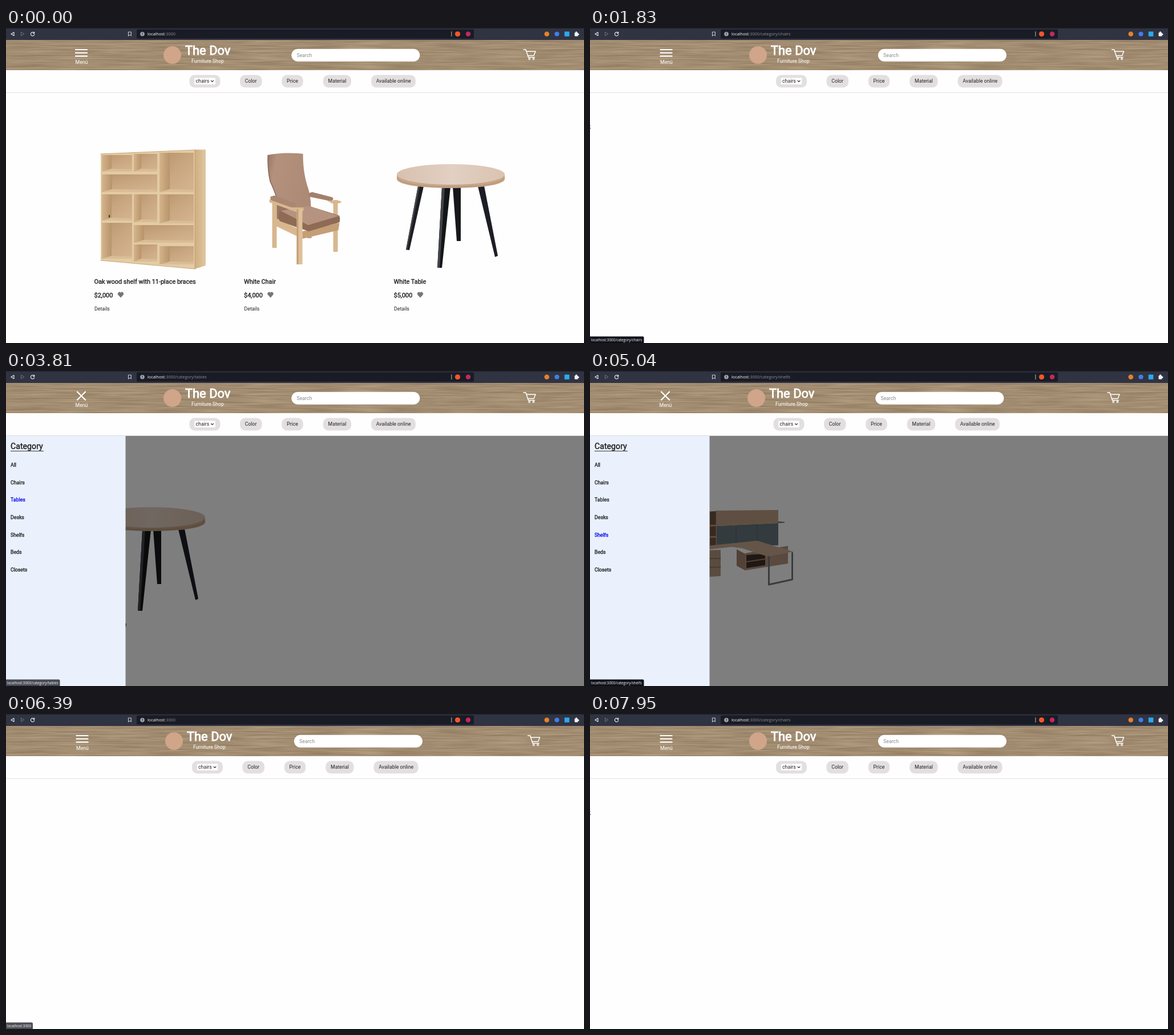
Recreate the animation shown at these times as an HTML page. Size 1013 px wide and 553 px high, loop 8000 ms.

```html
<!DOCTYPE html>
<html lang="en">
<head>
<meta charset="utf-8">
<title>Furniture Shop</title>
<style>
html, body { margin: 0; width: 100%; height: 100%; overflow: hidden; background: #fefefe; }
svg { display: block; width: 100vw; height: 100vh; }
text { font-family: Roboto, sans-serif; font-size: 8.76px; fill: #222; white-space: pre; }
.chrome { font-family: "Open Sans", "Noto Sans", sans-serif; }
.bold { stroke: #1c1c1c; stroke-width: .35px; fill: #1c1c1c; }
.item { stroke-width: .3px; }
.item.on { fill: #0000ee; stroke: #0000ee; }
.head { font-size: 10.95px; }
.light { fill: #fff; }
</style>
</head>
<body>
<svg id="stage" viewBox="0 0 1013 553" preserveAspectRatio="none">
  <defs>
    <filter id="wood" x="0" y="0" width="100%" height="100%" color-interpolation-filters="sRGB">
      <feTurbulence type="fractalNoise" baseFrequency=".012 .4" numOctaves="3" seed="8"/>
      <feColorMatrix values=".2 0 0 0 .535  .2 0 0 0 .452  .19 0 0 0 .35  0 0 0 0 1"/>
    </filter>
    <linearGradient id="cloth" x1="0" x2="1" y1="0" y2=".3">
      <stop offset="0" stop-color="#967765"/><stop offset=".22" stop-color="#b3917c"/><stop offset="1" stop-color="#ad8a75"/>
    </linearGradient>
    <linearGradient id="board" x1="0" x2="1">
      <stop offset="0" stop-color="#cfae80"/><stop offset="1" stop-color="#e0c6a0"/>
    </linearGradient>
    <linearGradient id="back" x1="0" x2=".8" y1="0" y2="1">
      <stop offset="0" stop-color="#b8946c"/><stop offset=".5" stop-color="#c8a680"/><stop offset="1" stop-color="#d3b38e"/>
    </linearGradient>
    <linearGradient id="side" x1="0" x2="1">
      <stop offset="0" stop-color="#d4b48c"/><stop offset="1" stop-color="#b8946a"/>
    </linearGradient>
    <linearGradient id="topwood" x1="0" x2="1">
      <stop offset="0" stop-color="#d8c0ad"/><stop offset=".5" stop-color="#e2d0c3"/><stop offset="1" stop-color="#dac3b0"/>
    </linearGradient>
  </defs>
  <rect width="1013" height="553" fill="#fefefe"/>
  <g id="page"></g>
  <rect id="shade" y="113.5" width="1013" height="439.5" fill="#000"/>
  <g id="panel"></g>
  <g id="top"></g>
  <g id="status"><path id="statusBox" fill="#10121b"/><text id="statusText" class="chrome light" x="2" y="549.8" style="font-size:6.25px"/></g>
</svg>
<script>
const LOOP = 8000;
const $ = id => document.getElementById(id);
const clamp = v => Math.max(0, Math.min(1, v));
const ease = p => { p = clamp(p); return 1 - Math.pow(1 - p, 2.3) * (1 + 1.1 * p); };

const text = (x, y, s, cls = '', extra = '') => `<text x="${x}" y="${y}" class="${cls}" ${extra}>${s}</text>`;
const rect = (x, y, w, h, fill, r = 0) => `<rect x="${x}" y="${y}" width="${w}" height="${h}" rx="${r}" fill="${fill}"/>`;
const poly = (pts, fill) => `<polygon points="${pts}" fill="${fill}"/>`;
const path = (d, fill, stroke = 'none', w = 1) =>
  `<path d="${d}" fill="${fill}" stroke="${stroke}" stroke-width="${w}" stroke-linecap="round" stroke-linejoin="round"/>`;
const dot = (x, y, r, fill) => `<circle cx="${x}" cy="${y}" r="${r}" fill="${fill}"/>`;

// Furniture, all placed in the first column
const cell = (x, y, w, h) => {
  const d = Math.min(18, w * .32);
  return rect(x, y, w, h, 'url(#back)') + poly(`${x},${y} ${x + d},${y} ${x + d},${y + h - 5} ${x},${y + h}`, 'url(#side)') +
    poly(`${x},${y + h} ${x + d},${y + h - 5} ${x + w},${y + h - 4} ${x + w},${y + h}`, '#d9bd96');
};

const shelf = () =>
  poly('166,221 331,214 331,423 166,408', '#e3cba4') +
  poly('331,214 350,215 350,417 331,423', 'url(#board)') +
  cell(168, 223, 53, 29) + cell(224, 221, 41, 31) + cell(269, 219, 60, 69) +
  cell(168, 257, 97, 31) + cell(168, 292, 53, 46) + cell(224, 292, 41, 49) +
  cell(269, 292, 60, 51) + cell(168, 342, 53, 63) + cell(224, 346, 105, 31) +
  cell(224, 380, 41, 30) + cell(269, 383, 60, 32) +
  path('M166 221L331 214H350M331 214V423M166 408L331 423', 'none', '#bf9a6a', .8) +
  rect(180, 328, 2, 5, '#4a3520', 1);

const chair = () => {
  const wood = '#d8b78f', edge = '#c39e76';
  return rect(204, 303, 8, 83, wood, 1) + rect(311, 302, 8, 91, wood, 1) + rect(265, 363, 8, 6, edge) +
    path('M196 223Q225 217 258 221Q258 252 265 275Q272 294 272 316L219 322Q211 292 200 270Q195 250 196 223Z', 'url(#cloth)') +
    path('M197 224Q196 250 201 270Q211 292 219 320', 'none', '#8a6b59', 1.5) +
    poly('212,306 247,320 247,350 212,335', '#97755f') +
    poly('207,332 257,356 257,370 207,346', wood) + poly('257,357 322,342 320,355 257,370', edge) +
    path('M217 322L267 312L321 329Q324 333 322 341L268 357L217 339Q214 331 217 322Z', '#8f6b56') +
    path('M219 321L267 312L321 330L267 346Z', '#b69380') +
    poly('300,303 322,303 326,306 313,310', wood) +
    path('M268 290L274 288L309 297Q313 300 309 303L302 303L268 296Z', '#a3806c') +
    poly('199,301 238,315 259,315 259,321 246,323 199,306', wood) +
    path('M201 296L208 294L243 307Q248 311 243 314L236 314L201 302Z', '#a98772') +
    rect(247, 318, 10, 97, '#dfbf98', 1) + rect(247, 318, 3, 97, edge);
};

const table = () =>
  poly('197,278 207,278 182,390 176,389', '#1d1e22') + poly('197,278 200,278 178,390 176,389', '#45464c') +
  poly('258,279 272,279 272,374 265,374', '#17181b') +
  poly('302,278 313,277 337,400 332,402', '#1d1e25') +
  poly('239,279 254,279 239,421 231,421', '#141517') + poly('239,279 244,279 235,421 231,421', '#43444a') +
  path('M160 258V266C164 276 205 281 254.500 281S346 276 349 266V258Z', '#c6a588') +
  path('M160 263C168 275 210 279 254.500 279S341 275 349 263', 'none', '#aa8666', .7) +
  `<ellipse cx="254.500" cy="257" rx="94.500" ry="18" fill="url(#topwood)"/>`;

const desk = () =>
  poly('152,250 222,246 222,310 152,314', '#6e5442') +
  path('M152 274L222 271M152 294L222 291M209 247V310M222 246V310', 'none', '#c49f82', 2.5) +
  poly('222,272 330,267 330,306 222,306', '#66777c') +
  path('M256 271V305M293 269V300', 'none', '#4c5e63', .8) +
  poly('222,245 330,244 330,267 222,272', '#bf9f86') + poly('330,264 341,265 341,266.500 330,267', '#777') +
  poly('155,316 229,314 229,360 155,365', '#b69780') + path('M155 331L229 329M155 346L229 344', 'none', '#765a46', 1) +
  poly('257,313 272,321 272,350 257,342', '#a6846c') + poly('272,320 347,307 347,338 272,350', '#b4937c') +
  poly('274,323 307,321 307,341 274,346', '#3e3028') + path('M274 335L307 330', 'none', '#a98267', 2) +
  poly('155,312 293,298 293,304 155,319', '#c8a891') +
  poly('222,306 293,298 356,317 312,326 266,311', '#cbab94') +
  path('M313.500 326V375L354.500 366V319', 'none', '#74777a', 3);

const bed = () =>
  poly('150,262 300,250 300,310 150,330', '#c39d79') +
  poly('150,326 300,300 366,340 366,372 214,412 150,372', '#b88f69') +
  poly('150,312 298,290 364,328 364,352 214,392 150,356', '#e6e1da') +
  poly('190,314 298,292 364,328 240,356', '#f0ece6') +
  poly('160,302 215,294 226,306 172,316', '#f7f4ef') + poly('230,292 280,285 293,297 242,305', '#f7f4ef') +
  rect(360, 366, 6, 18, '#8e6b4b');

const closet = () =>
  rect(156, 222, 206, 194, '#c9a57c') + rect(156, 222, 206, 5, '#dfc199') +
  [160, 228, 296].map(x => rect(x, 230, 62, 180, '#d8b88d')).join('') +
  path('M226 228V411M294 228V411', 'none', '#94704c', 1.2) +
  path('M218 310V332M233 310V332M301 310V332', 'none', '#55483c', 2);

const GOODS = {
  shelf: [shelf(), 'Oak wood shelf with 11-place braces', '$2,000'],
  chair: [chair(), 'White Chair', '$4,000'],
  table: [table(), 'White Table', '$5,000'],
  desk: [desk(), 'White Desk', '$6,000'],
  bed: [bed(), 'White Bed', '$7,000'],
  closet: [closet(), 'White Closet', '$8,000']
};
const card = (key, col) => {
  const [art, name, price] = GOODS[key];
  return `<g transform="translate(${col * 262.5} 0)">${art}` +
    text(154.5, 448.5, name, 'bold head') + text(154.5, 472.6, price, 'bold head') +
    path('M201 473L196.800 468.600C194.500 465.500 198.500 461.500 201 465C203.500 461.500 207.500 465.500 205.200 468.600Z', '#757575', '#757575', .6) +
    text(155, 496, 'Details') + '</g>';
};
const PAGES = { empty: '', home: ['shelf', 'chair', 'table'].map(card).join('') };
for (const key in GOODS) PAGES[key] = card(key, 0);

// Header, filters and browser bar
const pill = (x, w, s) => rect(x, 82.5, w, 22, '#e3dfe0', 9) + text(x + 8.8, 96.4, s);
const shift = (id, body) => `<g id="${id}">${body}</g>`;

$('top').innerHTML =
  rect(0, 73, 1013, 40.5, '#fefefe') + rect(0, 113, 1013, .8, '#dcdcdc') +
  `<rect y="21" width="1013" height="52.700" filter="url(#wood)"/>` +
  shift('menu',
    `<g id="bars">${[0, 1, 2].map(() => '<rect x="-11" y="-1.1" width="22" height="2.2" rx=".6" fill="#fff"/>').join('')}</g>` +
    text(121.5, 62.9, 'Menú', 'light')) +
  shift('brand', dot(291.5, 47.5, 15.5, '#d0a58a') +
    text(314, 46.8, 'The Dov', 'light', 'style="font-size:21.9px;stroke:#fff;stroke-width:.9px"') +
    text(325, 61.3, 'Furniture Shop', 'light')) +
  shift('search', rect(500.3, 36.8, 225, 22, '#fff', 11) + text(509.5, 50.5, 'Search', '', 'style="fill:#8b8b8b"')) +
  shift('cart', path('M907 38H911L915.500 51.500H926.500M912 41H928L925 48.500H914.500', 'none', '#fff', 1.5) +
    path('M918.500 54a1.300 1.300 0 1 1 -.01 -.1M925.800 54a1.300 1.300 0 1 1 -.01 -.1', 'none', '#fff', 1.2)) +
  shift('filters', rect(321.5, 82.5, 54, 22, '#e3dfe0', 9) + rect(330.3, 87.5, 36.5, 11.5, '#fff') +
    text(332.5, 96.4, 'chairs') + path('M359.500 92.300L361.500 94.300L363.500 92.300', 'none', '#222', 1.1) +
    pill(410, 38.5, 'Color') + pill(483.3, 37.4, 'Price') + pill(555.7, 49.3, 'Material') + pill(640, 78, 'Available online')) +
  rect(0, 0, 1013, 21, '#303341') + rect(0, 0, 1013, 1, '#20222d') +
  rect(229, 2.5, 591, 16, '#191c25', 2) +
  path('M14 7.500V13.500L8.800 10.500Z', 'none', '#e8e8ec', 1.1) + path('M26.500 7.500V13.500L31.700 10.500Z', 'none', '#6d707d', 1) +
  path('M49.300 8.900A3.200 3.200 0 1 0 49.700 11.300M49.700 7V9.500H47.300', 'none', '#e8e8ec', 1.2) +
  path('M214.800 7H219.300V13.800L217 11.800L214.800 13.800Z', 'none', '#d5d6dc', 1) +
  dot(239, 10.6, 3.8, '#a2a5ae') + path('M239 8.500V11M239 12.600V12.700', 'none', '#191c25', 1) +
  text(248, 13.2, '<tspan fill="#fff">localhost</tspan><tspan fill="#8d9099">:3000</tspan><tspan id="route" fill="#8d9099"></tspan>', 'chrome', 'style="font-size:7.25px"') +
  rect(780.4, 6, .9, 9, '#c8cad2') + dot(791.5, 10.5, 4.6, '#f5552b') + dot(810, 10.5, 4.2, '#c5285c') +
  dot(947.8, 10.5, 4.3, '#e5812c') + dot(965.5, 10.5, 4.1, '#3f7ee8') + rect(978.8, 6.2, 8.6, 8.6, '#2aa9f0', 1) +
  rect(996.5, 8, 6, 6.4, '#f2f2f4', .8) + dot(999.5, 7.6, 1.5, '#f2f2f4') + dot(1003, 11, 1.5, '#f2f2f4');

const CATS = ['All', 'Chairs', 'Tables', 'Desks', 'Shelfs', 'Beds', 'Closets'];
$('panel').innerHTML = rect(0, 113.8, 209.5, 440, '#eaf1fd') +
  text(8, 137, 'Category', 'bold', 'style="font-size:14.2px"') + rect(8, 140.2, 58, .9, '#222') +
  CATS.map((c, i) => text(8, 168.1 + i * 30.65, c, 'item bold')).join('');
const items = [...document.querySelectorAll('.item')];
const bars = [...$('bars').children];

// Schedules: [start, value]; the last started entry holds
const at = (list, t) => { let v = list[0][1]; for (const [s, x] of list) if (t >= s) v = x; return v; };
const ROUTE = [[0, 'All'], [1680, 'Chairs'], [3600, 'Tables'], [4650, 'Desks'], [5040, 'Shelfs'], [5280, 'Beds'],
  [5460, 'Closets'], [6210, 'All'], [7800, 'Chairs']];
const HOVER = [[0, ''], [1500, 'Chairs'], [1850, ''], [3600, 'Tables'], [3900, ''], [4500, 'Desks'], [4680, ''],
  [4890, 'Shelfs'], [5130, 'Beds'], [5460, 'Closets'], [5760, ''], [6180, 'All'], [6480, ''], [7740, 'Chairs']];
const PAGE = [[0, 'home'], [1680, 'empty'], [2970, 'chair'], [3630, 'table'], [4680, 'desk'], [5070, 'shelf'],
  [5280, 'bed'], [5490, 'closet'], [6220, 'empty'], [7410, 'home'], [7810, 'empty']];
const MENU = [[-999, 0], [1093, 1], [1650, 0], [3193, 1], [6200, 0], [7573, 1], [7765, 0]];
const TIP = [[1500, 2010, 'Chairs'], [3600, 3810, 'Tables'], [4650, 4890, 'Desks'], [4890, 5130, 'Shelfs'],
  [5130, 5460, 'Beds'], [5460, 5670, 'Closets'], [6180, 6390, 'All']];
const POINTED = [[1110, 1400], [2460, 3330], [6960, 7690]];
const FADES = ['Chairs', 'Tables', 'Closets', 'All'];
const slug = c => c === 'All' ? '' : '/category/' + c.toLowerCase();

let shown;
function drawMenu(t) {
  let [since, open] = MENU[0];
  for (const [s, v] of MENU) if (t >= s) [since, open] = [s, v];
  const slide = ease((t - since) / 170), k = open ? slide : 1 - slide;
  $('panel').setAttribute('transform', `translate(${-210 * (1 - k)} 0)`);
  $('panel').style.display = k > .001 ? '' : 'none';
  $('shade').setAttribute('opacity', .5 * clamp(k * 1.05));

  const q = clamp(open ? (t - since - 15) / 220 : 1 - (t - since) / 180);
  const turn = 45 * clamp((q - .72) / .28);
  const ys = [-5.6 * (1 - clamp(q / .6)), 0, 5.8 * (1 - clamp((q - .5) / .22))];
  bars.forEach((b, i) => b.setAttribute('transform', `translate(132 ${43.6 + ys[i]}) rotate(${turn * (1 - i)})`));
  bars[1].setAttribute('opacity', q > .7 ? 0 : 1);
  const span = POINTED.find(([a, b]) => t >= a && t < b);
  $('bars').setAttribute('opacity', span ? 1 - .25 * clamp((t - span[0] + 30) / 90) : 1);
}

function draw(t) {
  const route = at(ROUTE, t), hover = at(HOVER, t), page = at(PAGE, t);
  const wide = page === 'empty' ? 1 : 0;
  const view = page + route;
  if (view !== shown) {
    shown = view;
    $('page').innerHTML = PAGES[page] + (wide && route !== 'All' ? text(-.6, 176, ';') : '');
    $('route').textContent = slug(route);
    for (const [id, dx] of [['menu', 1.5], ['brand', 3], ['search', 4.6], ['cart', 7.6], ['filters', 4.5]])
      $(id).setAttribute('transform', `translate(${dx * wide} 0)`);
  }
  items.forEach((el, i) => el.classList.toggle('on', CATS[i] === route || CATS[i] === hover));
  drawMenu(t);

  let tip = '', alpha = 0;
  for (const [a, b, c] of TIP) {
    const fade = FADES.includes(c) ? 1 - (t - b + 30) / 120 : 0;
    const v = t < a ? 0 : t < b ? 1 : clamp(fade);
    if (v > 0) { tip = c; alpha = v; }
  }
  $('status').setAttribute('opacity', alpha);
  if (tip) {
    const w = tip === 'All' ? 47 : tip === 'Closets' ? 98 : tip === 'Beds' ? 90 : 94.5;
    $('statusBox').setAttribute('d', `M0 541.500H${w - 2}Q${w} 541.500 ${w} 543.500V553H0Z`);
    $('statusText').textContent = 'localhost:3000' + slug(tip);
  }
}

function tick() {
  draw(performance.now() % LOOP);
  requestAnimationFrame(tick);
}
tick();
</script>
</body>
</html>
```
